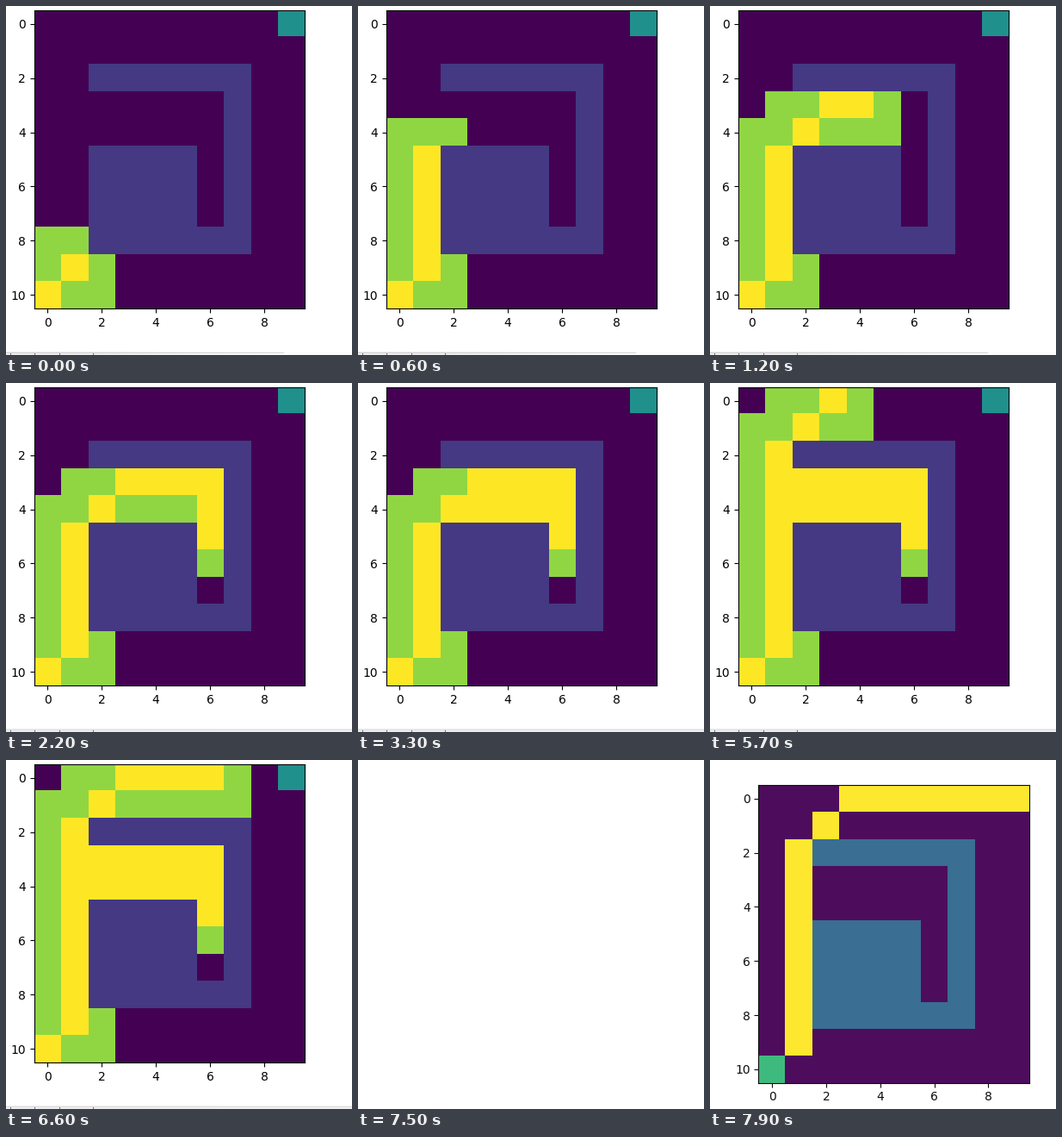
Write a matplotlib script that moves like this. It is 402 px wide and 405 px high and loops after 8000 ms.

```python
import numpy as np
import matplotlib.pyplot as plt
from matplotlib.animation import FuncAnimation
from matplotlib.patches import Rectangle

W, H, DPI = 402, 405, 100
TICK = 100            # ms per frame
FRAMES = 80
ROWS, COLS = 11, 10
EMPTY, WALL, GOAL, OPEN, CLOSED = 0, 1, 3, 5, 6

# Cells (column, row) in the order the search expands them, and when (in ticks)
ORDER = ([(0, 10)] + [(1, r) for r in range(9, 4, -1)]
         + [(2, 4), (3, 3), (4, 3), (5, 3), (6, 3)]
         + [(6, 4), (6, 5), (5, 4), (4, 4), (3, 4)]
         + [(2, 3), (1, 3), (1, 4), (1, 2), (2, 1)]
         + [(c, 0) for c in range(3, 8)])
TIMES = [0, 0, 1, 3, 4, 6, 8, 10, 12, 14, 17, 19, 22, 25, 28, 31,
         35, 38, 42, 46, 50, 54, 58, 62, 66, 70]

SEARCH_END = 75
RESULT_START = 78
FADE = {73: 0.35, 74: 0.85, 75: 1, 76: 1, 77: 1, 78: 0.5, 79: 0.05}


def make_walls():
    grid = np.zeros((ROWS, COLS))
    grid[2, 2:8] = WALL
    grid[2:9, 7] = WALL
    grid[5:9, 2:6] = WALL
    grid[8, 2:8] = WALL
    return grid


def search_grid(tick):
    grid = make_walls()
    grid[0, 9] = GOAL
    for (c, r), start in zip(ORDER, TIMES):
        if start > tick:
            break
        near = grid[max(r - 1, 0):r + 2, max(c - 1, 0):c + 2]
        near[near == EMPTY] = OPEN
        grid[r, c] = CLOSED
    return grid


def result_grid():
    grid = make_walls()
    grid[2:10, 1] = 3
    grid[1, 2] = 3
    grid[0, 3:] = 3
    grid[10, 0] = 2
    return grid


def box(left, top, width, height):
    """Pixel box with its origin at the top left, as figure fractions."""
    return [left / W, 1 - (top + height) / H, width / W, height / H]


SEARCH_BOX = box(32.6, 5, 314.6, 346)
RESULT_BOX = box(56.4, 29, 314.2, 345.6)

# The small margin keeps the pixel size from being rounded down
fig = plt.figure(figsize=((W + 0.01) / DPI, (H + 0.01) / DPI), dpi=DPI,
                 facecolor="white")
ax = fig.add_axes(SEARCH_BOX)
image = ax.imshow(search_grid(0), cmap="viridis", vmin=0, vmax=CLOSED,
                  interpolation="nearest", aspect="auto")
ax.set_xticks(range(0, COLS, 2))
ax.set_yticks(range(0, ROWS, 2))
ax.tick_params(labelsize=10, labelfontfamily="DejaVu Sans")

# Upper edge of the toolbar below the plot
bar = fig.add_axes(box(0, 401, W, 4))
bar.axis("off")
shade = bar.imshow(np.zeros((1, 2, 3)), extent=(0, W, 4, 1),
                   interpolation="bilinear", aspect="auto")
bar.set(xlim=(0, W), ylim=(4, 0))
edge = bar.axhline(1.3, color="#d4d4d4", lw=0.7)
for x in (5, 33, 62, 101):
    bar.plot([x, x], [2.4, 4], color="#777777", lw=0.8)

veil = Rectangle((0, 0), 1, 1, transform=fig.transFigure,
                 facecolor="white", edgecolor="none", zorder=100)
fig.add_artist(veil)


def update(tick):
    if tick < RESULT_START:
        ax.set_position(SEARCH_BOX)
        image.set_data(search_grid(tick))
        image.set_clim(0, CLOSED)
    else:
        ax.set_position(RESULT_BOX)
        image.set_data(result_grid())
        image.set_clim(0, 3)
    bar.set_visible(tick < SEARCH_END)
    early = tick < 22
    right = 0.99 if early else 0.94
    shade.set_data(np.array([[[0.93] * 3, [right] * 3]]))
    edge.set_color("#d4d4d4" if early else "#e0e0e0")
    edge.set_xdata([0, 0.8 if early else 1])
    veil.set_alpha(FADE.get(tick, 0))
    return image, shade, edge, veil


anim = FuncAnimation(fig, update, frames=FRAMES, interval=TICK,
                     repeat=True, repeat_delay=0, blit=False)
plt.show()
```
